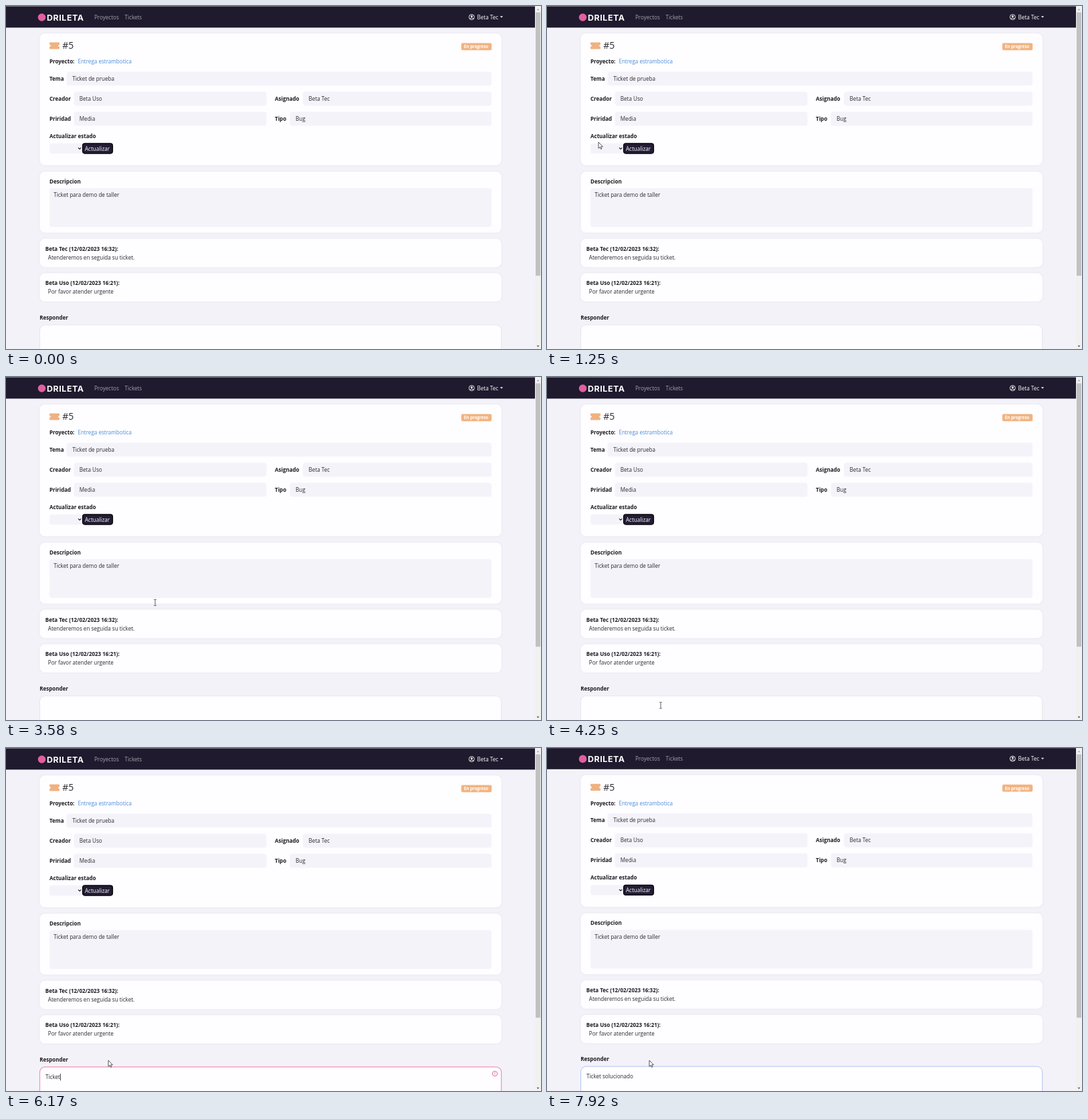
Recreate the animation shown at these times as an HTML page. Size 800 by 514 pixels, loop 8 s.

```html
<!DOCTYPE html>
<html lang="es">
<head>
<meta charset="utf-8">
<title>Ticket</title>
<style>
  html, body { margin: 0; width: 100%; height: 100%; overflow: hidden; background: #f4f2f9; }
  svg { display: block; width: 100vw; height: 100vh; }
  text { font: 8.1px "Open Sans", "Noto Sans", sans-serif; fill: #2a2a30; white-space: pre; }
  .b { font-weight: 700; font-size: 8px; fill: #1c1c22; }
  .h { font-weight: 500; font-size: 14px; }
  .nav { fill: #a3a1aa; }
  .light { fill: #fff; }
  .link { fill: #4a8edb; }
  .badge { font-weight: 700; font-size: 6.2px; fill: #fff; }
  .brand { font: 700 12.4px Inter, "Open Sans", sans-serif; letter-spacing: .6px; fill: #fff; }
  .card { fill: #fefdff; filter: drop-shadow(0 .8px 1.2px rgba(40, 30, 70, .1)); }
  .field { fill: #f5f3fa; }
</style>
</head>
<body>
<svg viewBox="0 0 800 514" preserveAspectRatio="none">
  <rect width="800" height="514" fill="#f4f2f9"/>
  <g id="page">
    <rect y="0" width="791" height="1" fill="#8d8b95"/>
    <rect y=".8" width="791" height="31.6" fill="#1f1a2e"/>
    <circle cx="53.5" cy="17" r="5.8" fill="#e0609f"/>
    <g fill="none" stroke="#fff" stroke-width=".9">
      <circle cx="696.3" cy="16.6" r="4"/>
      <path d="M693.4 19.2q2.9-2.6 5.8 0"/>
    </g>
    <circle cx="696.3" cy="15.4" r="1.5" fill="#fff"/>
    <path d="M738.8 15.3h4.4l-2.2 2.3z" fill="#fff"/>
    <g id="boxes"></g>
    <path d="M66 54.4h13q1 0 1 1v2.3a1.8 1.8 0 0 0 0 3.6v2.2q0 1-1 1H66q-1 0-1-1v-2.2a1.8 1.8 0 0 0 0-3.6v-2.3q0-1 1-1z" fill="#efb281"/>
    <rect x="680.8" y="55.4" width="45.4" height="10.8" rx="2" fill="#f2b380"/>
    <path d="M108 212.4l2.1 2.1 2.1-2.1" fill="none" stroke="#1c1c22" stroke-width="1.2"/>
    <rect x="114.6" y="206" width="44.8" height="15" rx="3.4" fill="#231d35" stroke="#08060c" stroke-width="1.4"/>
    <rect id="area" x="50.5" y="477.8" width="690.2" height="70" rx="8" fill="#fefdff"/>
    <g id="alert" fill="none" stroke="#dd5c86" stroke-width=".9">
      <circle cx="731" cy="488" r="3.7"/>
      <path d="M731 485.9v2.5M731 489.3v.9"/>
    </g>
    <g id="labels"></g>
    <text id="reply" x="59" y="496"></text>
    <rect id="caret" y="488" width=".8" height="10.4" fill="#1c1c22"/>
  </g>
  <rect x="791" width="9" height="514" fill="#f1f1f2"/>
  <rect x="792" y="9.5" width="7" height="394.7" fill="#c1c1c3"/>
  <path d="M793.5 6.3h4l-2-2.3z" fill="#a3a3a3"/>
  <path d="M793.5 508.7h4l-2 2.3z" fill="#505050"/>
  <g id="mouse">
    <path id="arrow" d="M0 0V9.3L2.1 7.4 3.5 10.5 4.9 9.9 3.6 6.8H6.4Z" fill="#fff" stroke="#222" stroke-width=".75"/>
    <path id="beam" d="M-1.8-4.6h1.3l.5.5.5-.5h1.3M0-4.2v8.4M-1.8 4.6h1.3l.5-.5.5.5h1.3" fill="none" stroke="#333" stroke-width=".8"/>
  </g>
</svg>
<script>
const LOOP = 8000;
const $ = id => document.getElementById(id);

function add(parent, tag, attrs, content = '') {
  const el = document.createElementNS('http://www.w3.org/2000/svg', tag);
  for (const key in attrs) el.setAttribute(key, attrs[key]);
  el.textContent = content;
  $(parent).append(el);
}
const box = (cls, rx) => (x, y, right, bottom) =>
  add('boxes', 'rect', { class: cls, x, y, width: right - x, height: bottom - y, rx });
const card = box('card', 8), field = box('field', 4);
const label = (x, y, str, cls = '') => add('labels', 'text', { x, y, class: cls }, str);

const DEV = 'Beta Tec', USER = 'Beta Uso';

card(50.3, 41, 741, 238.8);
card(50.3, 248, 741, 339.8);
card(50.3, 348.6, 741, 391.4);
card(50.3, 400.3, 741, 443);
field(90.5, 98.4, 726, 119.2);
field(101.5, 128.4, 389.5, 149.4);
field(444, 128.4, 726, 149.4);
field(101.5, 158.4, 389.5, 179.6);
field(424.5, 158.4, 726, 179.6);
field(65, 205.8, 114, 221.2);
field(65, 273, 726, 331);

label(61, 21.6, 'DRILETA', 'brand');
label(132, 19.9, 'Proyectos', 'nav');
label(177.5, 19.9, 'Tickets', 'nav');
label(704.5, 19.9, DEV, 'light');
label(84.3, 64.2, '#5', 'h');
label(684.8, 63.2, 'En progreso', 'badge');
label(65, 86.2, 'Proyecto:', 'b');
label(107.4, 86.2, 'Entrega estrambotica', 'link');
label(65, 112, 'Tema', 'b');
label(99.2, 112, 'Ticket de prueba');
label(65, 142.1, 'Creador', 'b');
label(109.8, 142.1, USER);
label(402, 142.1, 'Asignado', 'b');
label(452.6, 142.1, DEV);
label(65, 172.1, 'Priridad', 'b');
label(109.8, 172.1, 'Media');
label(402, 172.1, 'Tipo', 'b');
label(433, 172.1, 'Bug');
label(65, 198, 'Actualizar estado', 'b');
label(118, 216.6, 'Actualizar', 'light');
label(65, 265.6, 'Descripcion', 'b');
label(71.2, 286.2, 'Ticket para demo de taller');
label(58.8, 366.7, DEV + ' (12/02/2023 16:32):', 'b');
label(62.8, 379.7, 'Atenderemos en seguida su ticket.');
label(58.8, 418.2, USER + ' (12/02/2023 16:21):', 'b');
label(62.8, 431.2, 'Por favor atender urgente');
label(50.3, 469.8, 'Responder', 'b');

const REPLY = 'Ticket solucionado';
const FOCUS = 4400, TYPE = 5670, VALID = 6560, DONE = 7250, SHIFT = 7500;

// time, then values
const path = [[650, -8, 300], [1150, 77, 204], [2790, 77, 204], [3500, 223, 338],
  [3640, 223, 338], [4150, 170, 492], [4450, 170, 492], [4850, 153, 468]];
const typing = [[TYPE, 1], [6150, 6], [6970, 14], [DONE, 18]];

const clamp = v => Math.max(0, Math.min(1, v));
const smooth = v => v * v * (3 - 2 * v);
const mix = (a, b, k) => a.map((v, i) => v + (b[i] - v) * k);

function sample(keys, t, ease = v => v) {
  let i = 0;
  while (i < keys.length - 2 && t >= keys[i + 1][0]) i++;
  const [t0, ...a] = keys[i], [t1, ...b] = keys[i + 1];
  return mix(a, b, ease(clamp((t - t0) / (t1 - t0))));
}

const GREY = [231, 228, 238], BLUE = [178, 197, 240], PINK = [236, 150, 184];

function draw(t) {
  const fade = start => clamp((t - start) / 150);
  $('page').setAttribute('transform', `translate(0 ${t >= SHIFT ? -0.6 : 0})`);

  const red = fade(TYPE) - fade(VALID);
  const border = mix(mix(GREY, BLUE, fade(FOCUS)), PINK, red);
  $('area').setAttribute('stroke', `rgb(${border.map(Math.round)})`);
  $('area').setAttribute('stroke-width', 1 + red * 0.2);
  $('alert').setAttribute('opacity', t >= TYPE && t < VALID ? 1 : 0);

  const count = t < TYPE ? 0 : Math.floor(sample(typing, t)[0] + 1e-6);
  const reply = $('reply');
  reply.textContent = REPLY.slice(0, count);
  const blink = start => Math.floor((t - start) / 500) % 2 === 0;
  const caretOn = t >= FOCUS && (t < TYPE ? blink(FOCUS) : t < DONE || (t < 7900 && blink(DONE)));
  $('caret').setAttribute('x', 59.2 + (count ? reply.getComputedTextLength() : 0));
  $('caret').setAttribute('opacity', caretOn ? 1 : 0);

  const [x, y] = sample(path, t, smooth);
  const overText = (t > 3000 && t < 3900 && y > 255) || y > 478;
  $('mouse').setAttribute('transform', `translate(${x} ${y})`);
  $('mouse').setAttribute('opacity', t >= path[0][0] ? 1 : 0);
  $('arrow').setAttribute('opacity', overText ? 0 : 1);
  $('beam').setAttribute('opacity', overText ? 1 : 0);
}

const start = performance.now();
function tick() {
  draw((performance.now() - start) % LOOP);
  requestAnimationFrame(tick);
}
tick();
</script>
</body>
</html>
```
